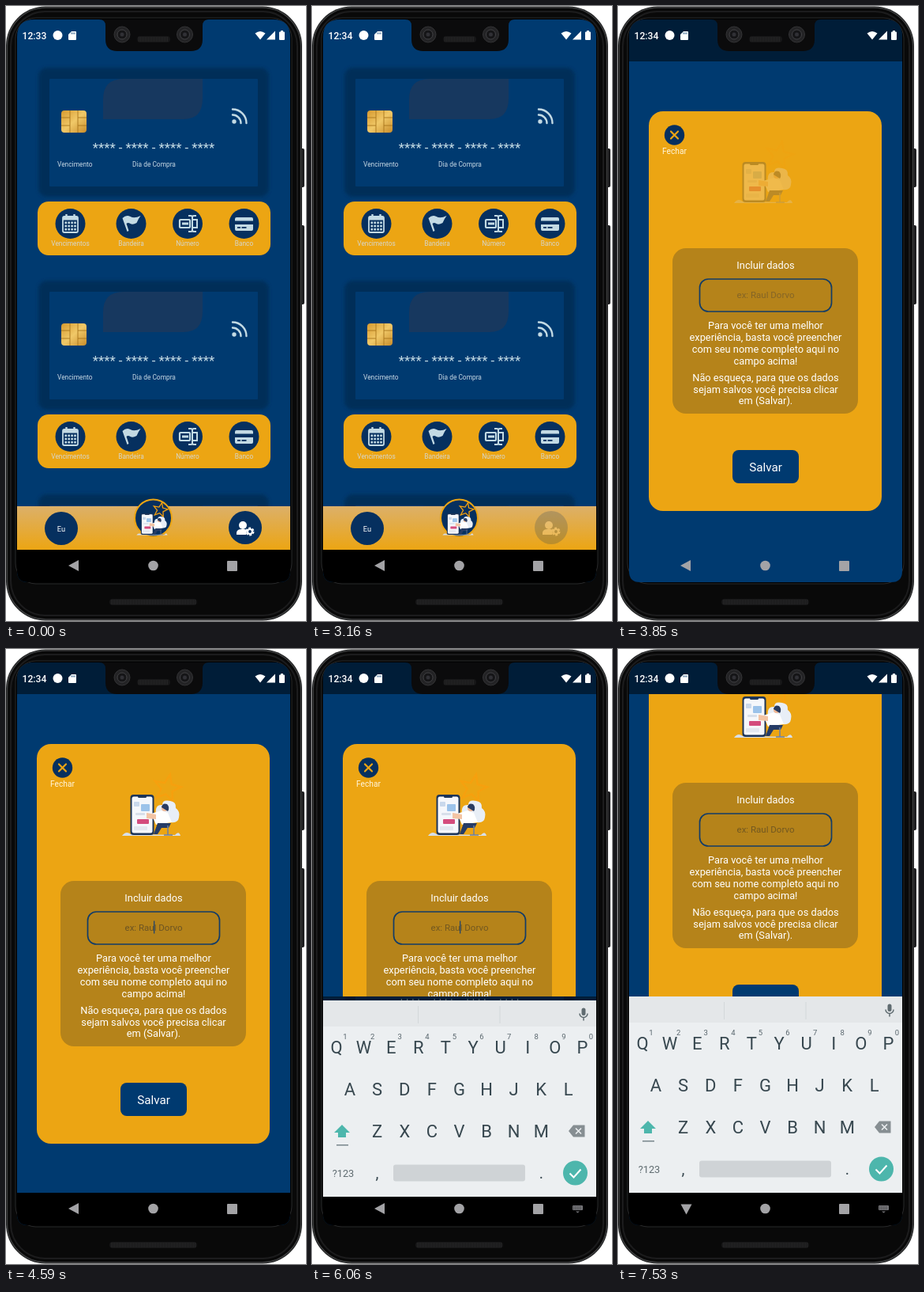
Recreate the animation shown at these times as an HTML page. Size 380x777 px, loop 8000 ms.

```html
<!DOCTYPE html>
<html lang="pt">
<head>
<meta charset="utf-8">
<title>Cartões</title>
<style>
html, body { margin: 0; width: 100%; height: 100%; overflow: hidden; background: #fff; }
svg { display: block; width: 380px; height: 777px; font-family: Roboto, "Noto Sans", sans-serif; }
.mid { text-anchor: middle; }
</style>
</head>
<body>
<svg id="stage" viewBox="0 0 380 777"></svg>
<script>
const NAVY = '#003a70', DISC = '#06305f', GOLD = '#eca513', PALE = '#c3dae4', TEAL = '#4db6ac';

const rect = (x, y, w, h, r, fill, more = '') =>
  `<rect x="${x}" y="${y}" width="${w}" height="${h}" rx="${r}" fill="${fill}" ${more}/>`;
const disc = (x, y, r, fill, more = '') => `<circle cx="${x}" cy="${y}" r="${r}" fill="${fill}" ${more}/>`;
const path = (d, fill, more = '') => `<path d="${d}" fill="${fill}" ${more}/>`;
const line = (d, color, width, more = '') =>
  path(d, 'none', `stroke="${color}" stroke-width="${width}" ${more}`);
const text = (s, x, y, size, fill, more = 'class="mid"') =>
  `<text x="${x}" y="${y}" font-size="${size}" fill="${fill}" ${more}>${s}</text>`;
const at = (x, y, s) => `<g transform="translate(${x} ${y})">${s}</g>`;
const range = n => [...Array(n).keys()];

// Icons centred on 0,0
const icons = {
  calendar: rect(-9.5, -9, 19, 20, 2, 'none', `stroke="${PALE}" stroke-width="1.8"`) +
    line('M-9.5-6.5H9.5', PALE, 4) + line('M-5-12v5M5-12v5', PALE, 2.4) +
    range(12).map(i => rect(-7 + i % 4 * 3.9, -2.5 + (i >> 2) * 4.2, 2.6, 2.6, 0, PALE)).join(''),
  flag: path('M-11-7Q-6-12-1-9Q4-6 12-10Q9-6 7-1Q2 2-1 0Q-4-2-6 0L-3 9L-5 10Z', PALE),
  number: rect(-10, -5, 13, 10, 1, 'none', `stroke="${PALE}" stroke-width="2.2"`) +
    line('M-7 0H1', PALE, 3) +
    line('M1-10H4Q6-10 6-8V8Q6 10 4 10H1M11-10H8Q6-10 6-8M11 10H8Q6 10 6 8M7-5h5v10h-5', PALE, 2),
  card: rect(-11.5, -8, 23, 17, 2, PALE) + rect(-11.5, -3.5, 23, 4.5, 0, DISC) +
    rect(-8.5, 4, 4, 1.8, 0, DISC) + rect(-3, 4, 6, 1.8, 0, DISC),
  user: disc(-3, -4, 5, '#fff') + path('M-11 8V5Q-10 1-5 1H-1Q2 1 2 4L1 8Z', '#fff') +
    disc(6, 4, 4.2, 'none', 'stroke="#fff" stroke-width="2.6" stroke-dasharray="2.7 1.7"') +
    disc(6, 4, 2.9, 'none', 'stroke="#fff" stroke-width="2"'),
};

const star = (cx, cy, r) => 'M' + range(10).map(i => {
  const a = i * Math.PI / 5 - 1.35, d = i % 2 ? r * .42 : r;
  return (cx + d * Math.cos(a)).toFixed(1) + ' ' + (cy + d * Math.sin(a)).toFixed(1);
}).join('L') + 'Z';

const art = line(star(204, 176, 18), '#f6a00e', 2.4) +
  path('M147 236Q152 229 158 234L214 235Q219 229 221 236Z', '#d7dfe9') +
  path('M190 210Q188 196 198 197Q198 190 208 192Q216 193 215 201Q221 205 219 213Q218 220 209 219Z', '#e8eef6') +
  rect(157.5, 184, 30, 51, 4, '#1c3458') + rect(159.5, 186.5, 26, 46, 2.5, '#f5f7fb') +
  rect(167, 184.5, 11, 3.4, 1.5, '#1c3458') +
  rect(162, 193, 7, 6, 1, '#c9d8ec') + rect(171, 196, 11, 9, 1, '#9cc3ea') +
  rect(164, 207, 12, 3, 1, '#d8dfea') + rect(166, 215, 15, 6, 1, '#d44c7d') + rect(162, 224, 17, 5, 1, '#e3e8f0') +
  path('M184 208L197 204L205 207L210 219L190 222Z', '#fff') +
  path('M178 207L190 209V215L178 214Z', '#f3c4a4') + disc(201, 201, 4, '#f0b996') +
  path('M197 200Q198 194 204 196Q208 200 205 205Z', '#283b60') +
  path('M192 220H209L206 226H197L192 234H187Z', '#263c66') +
  line('M205 223V235M200 235H211', '#6c7f9f', 1.5);

const chip = rect(70, 132, 32, 28, 4, 'url(#chip)') +
  line('M70 141H81V151H70M81 132V141M81 151V160M91 132V160M91 141H102M91 151H102', '#a8741c', .9);

const card = y => at(0, y,
  rect(41, 78, 292, 163, 11, '#002e59', 'filter="url(#soft)"') +
  rect(55, 92, 264, 136, 1, NAVY) +
  path('M149 92H249V117Q249 143 225 143H123V118Q123 92 149 92Z', '#17385f') + chip +
  disc(289, 146, 2.7, PALE) +
  line('M287 137.5A10.5 10.5 0 0 1 297.5 148M287 130.5A17.5 17.5 0 0 1 304.5 148', PALE, 2.4, 'stroke-linecap="round"') +
  text('**** - **** - **** - ****', 187, 185, 16.8, PALE) +
  text('Vencimento', 65, 203, 8.4, '#c8d8e4', '') + text('Dia de Compra', 160, 203, 8.4, '#c8d8e4', '') +
  rect(40, 247, 295, 68, 14, GOLD) +
  [['calendar', 'Vencimentos', 81.5], ['flag', 'Bandeira', 158.5], ['number', 'Número', 230], ['card', 'Banco', 301.5]]
    .map(([icon, label, x]) => disc(x, 275, 19, DISC) + at(x, 275, icons[icon]) +
      text(label, x, 303, 8.3, '#d5d6cd')).join(''));

const page = rect(14, 17, 346, 711, 0, NAVY) + card(0) + card(269) + card(539) +
  rect(14, 632, 346, 55, 0, 'url(#bar)') +
  disc(70, 660, 21, DISC) + text('Eu', 70, 663.5, 9.3, '#fff') +
  disc(186.5, 647, 23.5, DISC, `stroke="${GOLD}" stroke-width="2"`) +
  `<g transform="translate(186.5 650) scale(.53) translate(-187 -201)">${art}</g>` +
  `<g id="userBtn">${disc(303, 659, 21, DISC)}${at(303, 660, icons.user)}</g>` +
  rect(14, 687, 346, 41, 0, '#000');

const copy = [
  ['Para você ter uma melhor', 395], ['experiência, basta você preencher', 410],
  ['com seu nome completo aqui no', 425], ['campo acima!', 440],
  ['Não esqueça, para que os dados', 461], ['sejam salvos você precisa clicar', 476], ['em (Salvar).', 490],
];
const modal = rect(39, 120, 295, 505, 18, GOLD) +
  disc(71.5, 150, 12.7, DISC) + line('M67 145.5l9 9m0-9l-9 9', GOLD, 2.2, 'stroke-linecap="round"') +
  text('Fechar', 71.5, 173.5, 10.2, '#fff5dc') +
  `<g id="art">${art}</g>` +
  rect(69, 293, 235, 209, 17, '#b5831a') + text('Incluir dados', 187, 319, 12.8, '#fff') +
  rect(103.5, 332, 167, 41, 11, 'none', 'stroke="#123c68" stroke-width="1.7"') +
  text('ex: Raul Dorvo', 187, 356.3, 11.5, '#725821', 'class="mid" id="hint"') +
  rect(187, 343.5, 1.3, 16, 0, '#23466c', 'id="caret"') +
  copy.map(([s, y]) => text(s, 187, y, 12.8, '#fff')).join('') +
  rect(145, 548, 84, 42, 8, NAVY) + text('Salvar', 187, 574.5, 15.2, '#fff');

const INK = '#37474f';
const keys = (row, x, y) => [...row].map((k, i) => text(k, x + i * 34.6, y, 22, INK)).join('');
const keyboard = rect(14, 439, 346, 248, 0, '#eceff1') + rect(14, 439, 346, 33, 0, '#e4e7e9') +
  line('M134.5 446V468M238 446V468', '#d3d8da', 1) +
  rect(341.5, 448.5, 5, 9.5, 2.5, '#5f6b70') + line('M339 455.5a5 5 0 0 0 10 0M344 461v3.5', '#5f6b70', 1.5) +
  keys('QWERTYUIOP', 31, 506) + keys('ASDFGHJKL', 48, 559) + keys('ZXCVBNM', 82.7, 612) +
  [...'1234567890'].map((k, i) => text(k, 42 + i * 34.6, 488, 9.5, '#59666d')).join('') +
  path('M38 596l10 10h-5v6h-10v-6h-5Z', TEAL) + rect(31, 621, 15, 1.5, 0, '#78868c') +
  path('M325 604l6-7.5h14.500v15h-14.500Z', '#868e92') + line('M334 600.500l7 7m0-7l-7 7', '#eceff1', 1.6) +
  text('?123', 39.5, 661.5, 12.8, '#5f6b70') + text(',', 82.5, 664, 20, INK) +
  rect(103, 646.5, 167, 21, 3, '#cfd3d6') + text('.', 290.5, 664, 20, INK) +
  disc(333.5, 657, 15.5, TEAL) + line('M326.500 657.500l5 5 9-10', '#fff', 2);

const NAV = '#a3a3a6';
const navIcons = `<g id="back">${path('M79 707L92 700V714Z', NAV)}</g>` +
  disc(186.5, 707, 6.3, NAV) + rect(280, 701, 13, 13, 1, NAV) +
  `<g id="kbdIcon">${rect(330, 703, 13, 6, 1, '#77777b')}${line('M331 705h11M331 707.300h11', '#111', .9, 'stroke-dasharray="1 1.200"')}${path('M334 710.500h5l-2.500 2Z', '#77777b')}</g>`;

const status = text('12:33', 20.500, 42, 12.200, '#fff', 'id="clock" font-weight="500"') +
  disc(65.500, 37, 6, '#fff') +
  path('M83 32H88Q89 32 89 33V42Q89 43 88 43H80Q79 43 79 42V36Z', '#fff') +
  line('M83 33.500v2M85 33.500v2M87 33.500v2', NAVY, .9) +
  path('M315.500 34.500Q322 29.500 328.500 34.500L322 42.500Z', '#fff') + path('M341 31.500V42.500H330Z', '#fff') +
  rect(346, 32.500, 7, 10.500, 1, '#fff') + rect(348, 31, 3, 2, 0, '#fff');

const slots = (x, y, w) => line(`M${x} ${y}h${w}M${x} ${y + 2}h${w}M${x} ${y + 4}h${w}`, '#363636', 1, 'stroke-dasharray="1 1"');
const lens = x => disc(x, 36, 10, '#232325', 'stroke="#343436"') + disc(x, 36, 6, '#151517', 'stroke="#414144"') + disc(x, 36, 2.500, '#303035');

const body = rect(370, 180, 8, 49, 2, '#202022') + rect(370, 277, 8, 100, 2, '#202022') +
  rect(0, .5, 375, 776, 50, '#18191a') + rect(1.500, 2, 372, 773, 49, '#080808', 'stroke="#3c3d3e" stroke-width="1.500"') +
  rect(6, 7, 363, 763, 44, '#090909', 'stroke="#1c1c1d" stroke-width="2"') +
  rect(12, 15, 350, 715, 26, '#020202', 'stroke="#292a2b"');
const notch = path('M118 17Q126 17 126 25V42Q126 57 141 57H234Q249 57 249 42V25Q249 17 257 17Z', '#0b0b0c') +
  lens(147) + lens(226.500) + rect(166, 38, 42, 8, 4, '#171718') + slots(168, 40, 38);

const stage = document.getElementById('stage');
stage.innerHTML = `<defs>
  <filter id="soft" x="-10%" y="-10%" width="120%" height="120%"><feGaussianBlur stdDeviation="2"/></filter>
  <linearGradient id="bar" x2="0" y2="1"><stop stop-color="#dcb069"/><stop offset="1" stop-color="${GOLD}"/></linearGradient>
  <linearGradient id="chip" x2="1" y2="1"><stop stop-color="#d79a2f"/><stop offset=".5" stop-color="#f0c868"/><stop offset="1" stop-color="#c98d2b"/></linearGradient>
  <clipPath id="screen"><path d="M14 39Q14 17 36 17H338Q360 17 360 39V714Q360 728 346 728H28Q14 728 14 714Z"/></clipPath>
  <clipPath id="win"><rect id="winBox" x="14" y="57" width="346"/></clipPath>
</defs>` + body + `<g clip-path="url(#screen)">${page}
  ${rect(14, 17, 346, 711, 0, '#000', 'id="dim"')}
  <g id="modal" clip-path="url(#win)"><g id="sheet">${rect(14, 57, 346, 671, 0, NAVY)}<g id="content">${modal}</g></g></g>
  ${rect(14, 687, 346, 41, 0, '#000', 'id="navBar"')}
  <g id="keyboard">${keyboard}</g>${navIcons}${status}</g>` + notch +
  rect(131, 749, 111, 8, 4, '#171718') + slots(133, 751, 107);

const $ = id => document.getElementById(id);
const set = (id, name, value) => $(id).setAttribute(name, value);
const show = (id, on) => set(id, 'visibility', on ? 'visible' : 'hidden');
const shift = (id, y) => set(id, 'transform', `translate(0 ${y})`);
const clamp = v => Math.max(0, Math.min(1, v));
const within = (t, a, b) => t >= a && t < b;

// Value of the last [time, value] pair already reached
const held = (t, first, ...pairs) => pairs.reduce((v, [when, next]) => t >= when ? next : v, first);

function draw(t) {
  $('clock').textContent = t < 500 ? '12:33' : '12:34';
  set('userBtn', 'opacity', within(t, 3160, 3630) ? .2 : 1);

  // Sheet rises in steps, slowing as it settles
  const tick = 3630 + Math.floor((t - 3630) / 70) * 70;
  const rise = clamp((tick - 3495) / 400);
  show('modal', t >= 3630);
  shift('sheet', Math.round(671 * (1 - rise) ** 2));
  set('dim', 'opacity', t < 3630 ? 0 : .5 * clamp((tick - 3560) / 220));
  set('art', 'opacity', clamp((tick - 3770) / 300));
  show('navBar', within(t, 3970, 5930));
  set('winBox', 'height', t < 5930 ? 671 : 382);

  show('caret', within(t, 4590, 5120) || within(t, 5580, 6330) || within(t, 7000, 7530));
  set('hint', 'fill', held(t, '#846527', [4590, '#6c5423'], [4790, '#725821']));
  shift('content', t < 6330 ? 0 : -124);

  show('keyboard', t >= 5930);
  shift('keyboard', held(t, 212, [6000, 55], [6060, 5], [6130, 0]));
  set('keyboard', 'opacity', held(t, .2, [6000, .75], [6060, 1]));
  show('kbdIcon', t >= 5580);
  set('back', 'transform', `rotate(${held(t, 0, [6600, -30], [6665, -65], [6730, -90])} 86.500 707)`);
}

const start = performance.now();
function frame() {
  draw((performance.now() - start) % 8000);
  requestAnimationFrame(frame);
}
frame();
</script>
</body>
</html>
```
